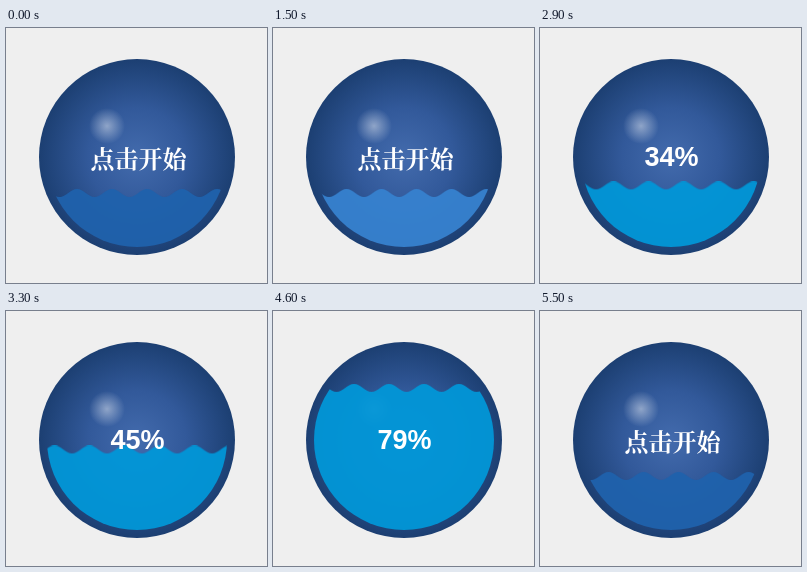
These frames come from a looping animation (261 px wide and 255 px high, 5.6 s). An HTML page:

```html
<!DOCTYPE html>
<html lang="zh">
<head>
<meta charset="utf-8">
<title>水球进度</title>
<style>
  @property --level { syntax: "<number>"; inherits: true; initial-value: 30; }

  html, body { margin: 0; width: 100%; height: 100%; overflow: hidden; background: #efefef; }

  .stage {
    position: relative; width: 261px; height: 255px;
    animation: fill 5.6s linear infinite;
  }
  svg { display: block; }

  .level { transform: translateY(calc(219px - 1.8px * var(--level))); }
  .wave {
    animation: drift 5.6s linear infinite, tint 5.6s step-end infinite;
  }

  .label {
    position: absolute; left: 2px; width: 100%; top: 110px;
    color: #fff; text-align: center; line-height: 40px; white-space: nowrap;
  }
  .start {
    font: bold 24px/40px "Noto Serif CJK SC", "Noto Serif", serif;
    animation: idle 5.6s step-end infinite;
  }
  .percent {
    font: bold 27px/40px "Liberation Sans", Arial, sans-serif;
    left: 1px; top: 109px;
    counter-reset: percent calc(var(--level));
    animation: busy 5.6s step-end infinite;
  }
  .percent::after { content: counter(percent) "%"; }

  @keyframes fill {
    0%, 28.57% { --level: 30; }
    28.5714% { --level: 0; }
    96.428% { --level: 100; }
    96.4285%, 100% { --level: 30; }
  }
  @keyframes drift { to { transform: translateX(140px); } }
  @keyframes tint {
    0%, 96.4285% { fill: #1f62ad; }
    17.857% { fill: #3782d0; }
    28.5714% { fill: #0297d8; }
  }
  @keyframes idle { 0%, 96.4285% { opacity: 1; } 28.5714% { opacity: 0; } }
  @keyframes busy { 0%, 96.4285% { opacity: 0; } 28.5714% { opacity: 1; } }
</style>
</head>
<body>
<div class="stage">
  <svg width="261" height="255">
    <defs>
      <radialGradient id="ball">
        <stop offset="0" stop-color="#436bad"/>
        <stop offset=".5" stop-color="#32599a"/>
        <stop offset="1" stop-color="#1c3f72"/>
      </radialGradient>
      <radialGradient id="shine">
        <stop offset="0" stop-color="#fff" stop-opacity=".45"/>
        <stop offset="1" stop-color="#fff" stop-opacity="0"/>
      </radialGradient>
      <clipPath id="bowl"><circle cx="131" cy="129" r="90"/></clipPath>
    </defs>
    <circle cx="131" cy="129" r="98" fill="url(#ball)"/>
    <circle cx="101" cy="98" r="18" fill="url(#shine)"/>
    <g clip-path="url(#bowl)">
      <g class="level"><path class="wave" fill-opacity=".94"/></g>
    </g>
  </svg>
  <div class="label start">点击开始</div>
  <div class="label percent"></div>
</div>
<script>
  // Ten sine-like periods, 35px long, 4px above and below the level line.
  const period = "c6.37 0 11.13 8 17.5 8s11.13 -8 17.5 -8";
  document.querySelector(".wave")
    .setAttribute("d", `M-104 -4${period.repeat(10)}V200H-104Z`);
</script>
</body>
</html>
```
